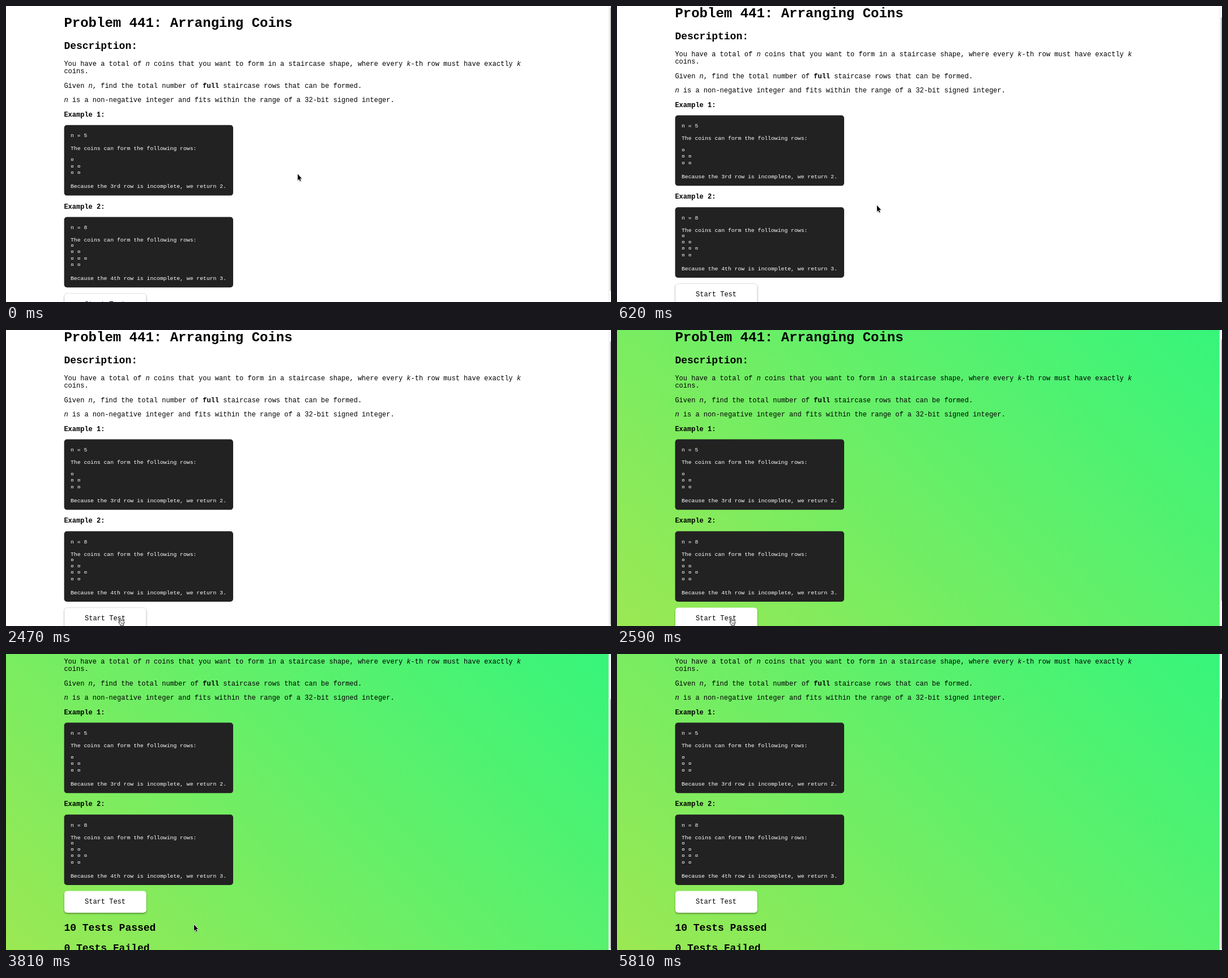
An HTML page with a canvas that plays this animation: 1068 px wide and 524 px high, repeating every 6.48 s.

```html
<!DOCTYPE html>
<html lang="en">
<head>
<meta charset="utf-8">
<title>Arranging Coins</title>
<style>
html, body { margin: 0; width: 100%; height: 100%; overflow: hidden; background: #fff; }
canvas { display: block; width: 1068px; height: 524px; }
</style>
</head>
<body>
<canvas id="stage"></canvas>
<script>
const W = 1068, H = 524, LOOP = 6480, PAGE_W = 1064;
const FONT = '"Liberation Mono", "Courier New", monospace';
const LEFT = 102.4;
const PASSED_AT = 2590, GONE_AT = 5810;

const canvas = document.getElementById('stage');
const ratio = window.devicePixelRatio || 1;
canvas.width = W * ratio;
canvas.height = H * ratio;
const ctx = canvas.getContext('2d');

// Stepped moves: start, end, number of steps, target
const scrollMoves = [
  [420, 620, 3, [17.25]],
  [3710, 3810, 2, [89.25]]
];
const pointerMoves = [
  [120, 240, 2, [459, 353]],
  [760, 760, 1, [459.4, 353.4]],
  [970, 1580, 8, [202.5, 510.5]],
  [1660, 1660, 1, [202, 510.5]],
  [2860, 2860, 1, [201.5, 510.5]],
  [3340, 3610, 4, [332, 479]],
  [4650, 4770, 2, [350, 478]],
  [4950, 5550, 8, [1013.5, 516]],
  [5640, 5730, 2, [1014, 519]]
];

const ease = p => p * p * (3 - 2 * p);

function follow(moves, start, t) {
  let at = start;
  for (const [t0, t1, steps, to] of moves) {
    if (t < t0) break;
    const done = t1 > t0 ? Math.floor((t - t0) / (t1 - t0) * (steps - 1) + 1e-6) + 1 : steps;
    const p = ease(Math.min(1, done / steps));
    at = at.map((v, i) => v + (to[i] - v) * p);
  }
  return at;
}

// "_" toggles italic, "*" toggles bold
function write(text, x, y, size = 12, color = '#000') {
  let bold = false, italic = false;
  ctx.fillStyle = color;
  for (const part of text.split(/([_*])/)) {
    if (part === '_') italic = !italic;
    else if (part === '*') bold = !bold;
    else if (part) {
      ctx.font = `${italic ? 'italic ' : ''}${bold ? 'bold ' : ''}${size}px ${FONT}`;
      ctx.fillText(part, x, y);
      x += ctx.measureText(part).width;
    }
  }
}

function panel(x, y, w, h, r, fill) {
  ctx.beginPath();
  ctx.roundRect(x, y, w, h, r);
  ctx.fillStyle = fill;
  ctx.fill();
}

function example(top, n, coinTop, coins, ending) {
  const line = (text, dy) => write(text, 114, top + dy, 9.75, '#fff');
  panel(102.6, top, 298.4, 124.8, 5, '#222');
  line('n = ' + n, 21.3);
  line('The coins can form the following rows:', 43.8);
  coins.forEach((count, i) => line(Array(count).fill('¤').join(' '), coinTop + i * 11.25));
  line(ending, 111.3);
}

function button(tested) {
  ctx.save();
  ctx.shadowColor = 'rgba(0,0,0,0.38)';
  ctx.shadowBlur = 3 * ratio;
  ctx.shadowOffsetY = 1.8 * ratio;
  panel(103, 508.8, 144.6, 38.4, 5, '#fff');
  ctx.restore();
  if (!tested) {
    ctx.strokeStyle = '#d8d8d8';
    ctx.lineWidth = 0.7;
    ctx.stroke();
  }
  write('Start Test', 139, 531.7);
}

function page(tested) {
  write('*Problem 441: Arranging Coins*', LEFT, 37, 24);
  write('*Description:*', LEFT, 76, 18);
  write('You have a total of _n_ coins that you want to form in a staircase shape, where every _k_-th row must have exactly _k_', LEFT, 105.8);
  write('coins.', LEFT, 119.2);
  write('Given _n_, find the total number of *full* staircase rows that can be formed.', LEFT, 144.8);
  write('_n_ is a non-negative integer and fits within the range of a 32-bit signed integer.', LEFT, 170.3);
  write('*Example 1:*', LEFT, 195.8);
  example(210.8, 5, 64.5, [1, 2, 2], 'Because the 3rd row is incomplete, we return 2.');
  write('*Example 2:*', LEFT, 358.6);
  example(373.5, 8, 53.5, [1, 2, 3, 2], 'Because the 4th row is incomplete, we return 3.');
  button(tested);
  if (tested) {
    write('*10 Tests Passed*', LEFT, 579, 18);
    write('*0 Tests Failed*', LEFT, 615, 18);
  }
}

function background(tested) {
  ctx.fillStyle = '#fff';
  ctx.fillRect(0, 0, W, H);
  if (!tested) return;
  const cx = PAGE_W / 2, cy = H / 2, d = (PAGE_W + H) / 4;
  const g = ctx.createLinearGradient(cx - d, cy + d, cx + d, cy - d);
  g.addColorStop(0, '#9be853');
  g.addColorStop(1, '#36f57b');
  ctx.fillStyle = g;
  ctx.fillRect(0, 0, PAGE_W, H);
}

function scrollbar(scroll, tested) {
  ctx.fillStyle = '#fafafa';
  ctx.fillRect(PAGE_W, 0, W - PAGE_W, H);
  ctx.fillStyle = '#e8e8e8';
  ctx.fillRect(PAGE_W - 0.3, 0, 0.8, H);
  const p = (scroll - 17.25) / 72;
  const top = tested ? 16 + 63 * p : 2 + scroll;
  const bottom = tested ? 480 + 43 * p : 505.5 + scroll;
  panel(1066, top, 6, bottom - top, 3, '#c1c1c1');
}

const arrow = new Path2D('M0 0V11.2L2.5 8.9L4.2 12.8L6 12L4.3 8.2H7.8Z');
const hand = new Path2D('M-1.5 1C-1.5-.5 .6-.5 .8 .9L1.4 4C2.2 3.4 3 3.7 3.3 4.5C4.1 4 4.8 4.3 5.1 5C6 4.7 6.6 5.2 6.6 6.2C6.7 8 6.2 9.2 5.6 10.2V12.3H-.2V11.3C-1.3 10-2.3 8.4-3.2 7.1C-4 5.8-2.6 5-1.6 6L-.6 7Z');
const fingers = new Path2D('M1.4 7.4V9.8M2.9 7.4V9.8M4.4 7.4V9.8');

function pointer(x, y, scroll) {
  const overButton = x > 103 && x < 248 && y + scroll > 509 && y + scroll < 547;
  ctx.save();
  ctx.translate(x, y);
  ctx.lineJoin = 'round';
  if (overButton) {
    ctx.fillStyle = '#fff';
    ctx.fill(hand);
    ctx.strokeStyle = '#000';
    ctx.lineWidth = 0.9;
    ctx.stroke(hand);
    ctx.lineWidth = 0.6;
    ctx.stroke(fingers);
  } else {
    ctx.scale(0.92, 0.98);
    ctx.shadowColor = 'rgba(0,0,0,0.3)';
    ctx.shadowBlur = 2 * ratio;
    ctx.shadowOffsetY = 0.7 * ratio;
    ctx.strokeStyle = '#fff';
    ctx.lineWidth = 1.5;
    ctx.stroke(arrow);
    ctx.shadowColor = 'transparent';
    ctx.fillStyle = '#000';
    ctx.fill(arrow);
  }
  ctx.restore();
}

function draw(t) {
  const tested = t >= PASSED_AT;
  const [scroll] = follow(scrollMoves, [0], t);
  ctx.setTransform(ratio, 0, 0, ratio, 0, 0);
  background(tested);
  ctx.save();
  ctx.translate(0, -scroll);
  page(tested);
  ctx.restore();
  scrollbar(scroll, tested);
  if (t < GONE_AT) {
    const [x, y] = follow(pointerMoves, [515, 297.5], t);
    pointer(x, y, scroll);
  }
}

const began = performance.now();
function tick() {
  draw((performance.now() - began) % LOOP);
  requestAnimationFrame(tick);
}
tick();
</script>
</body>
</html>
```
